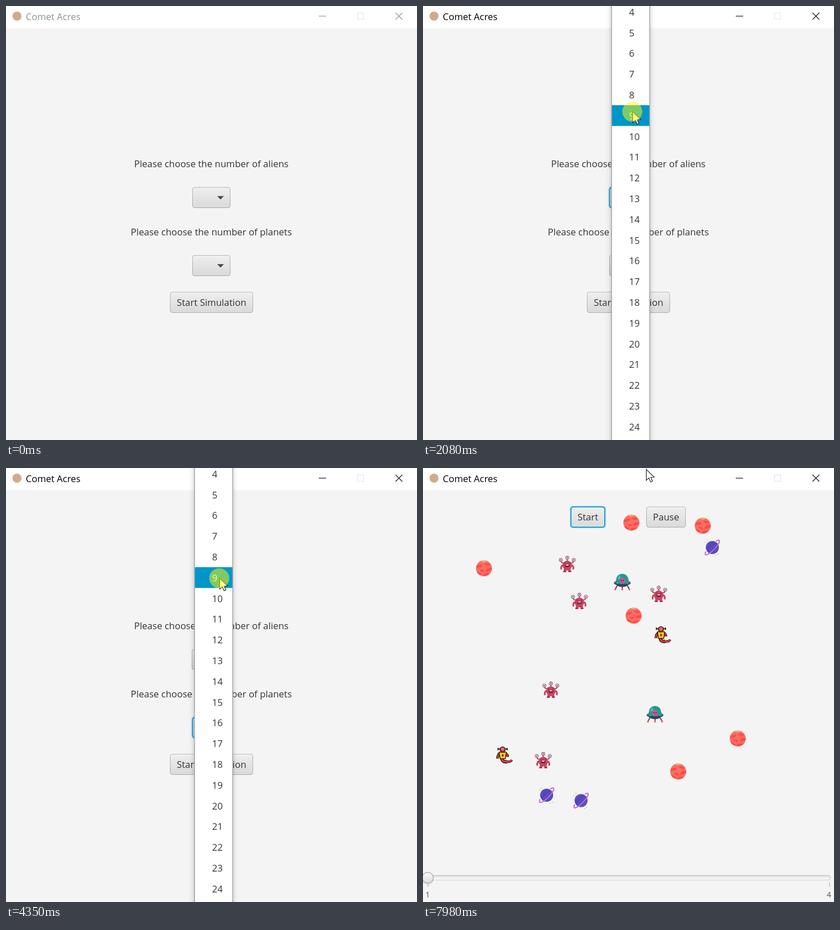
Recreate the animation shown at these times as an HTML page with a canvas. Size 728x770 px, loop 8 s.

```html
<!DOCTYPE html>
<html lang="en">
<head>
<meta charset="utf-8">
<title>Comet Acres</title>
<style>
  html, body { margin: 0; width: 100%; height: 100%; overflow: hidden; background: #f4f4f4; }
  canvas { display: block; }
</style>
</head>
<body>
<canvas id="stage" width="728" height="770"></canvas>
<script>
const ctx = document.getElementById('stage').getContext('2d');
const LOOP = 8000, STEP = 70;
const FONT = '"Open Sans", "Noto Sans", sans-serif';
const ROW = 36.8, ROW9 = 176;

// Motion is sampled in steps that restart at each of these times
const STARTS = [0, 70, 920, 1750, 2080, 2900, 3170, 4060, 4280, 6170, 6580, 6860, 7630];

// Pointer path: time, x, y
const PATH = [
  [70, 470, 772], [210, 440, 610], [350, 402, 420], [490, 386, 344], [770, 386, 341],
  [850, 391, 338], [920, 396, 330], [1060, 401, 295], [1300, 394, 246], [1500, 380, 208],
  [1680, 372, 190], [1750, 371, 187], [2220, 371, 187], [2430, 371, 330], [2620, 368, 470],
  [2690, 368, 478], [3170, 368, 478], [3310, 388, 408], [3450, 396, 330], [3650, 389, 226],
  [3800, 382, 189], [3990, 382, 189], [4060, 380, 192], [4130, 378, 195], [4420, 378, 195],
  [4630, 366, 370], [4840, 350, 508], [5040, 346, 537], [7560, 346, 537], [7630, 356, 518],
  [7700, 410, 434], [7770, 487, 302], [7840, 535, 172], [7910, 492, 66], [7980, 395, 2]
];

const PRESSES = [[560, 700], [2080, 2220], [2690, 2830], [4280, 4420], [6170, 6310]];
const POPUPS = [[770, 2220], [2900, 4420]];

const RED_PLANETS = [[369, 97], [495.5, 102.5], [108, 178], [373, 262], [557.5, 480], [452, 538.5]];
const RINGED = [[512.5, 141], [219, 580.5], [280, 590]];
const MONSTERS = [[255.5, 171], [277, 236.5], [417.5, 224], [226.5, 394], [213, 519]];
const SAUCERS = [[353, 202.5], [411, 437]];
const TAILED = [[424.5, 296], [144, 509.5]];

const within = (t, spans) => spans.some(([a, b]) => t >= a && t < b);
const clamp = v => Math.max(0, Math.min(1, v));

function sampleTime(t) {
  const start = STARTS.filter(s => s <= t).pop();
  return start + Math.floor((t - start) / STEP) * STEP;
}

function pointerAt(t) {
  if (t < PATH[0][0]) return null;
  const i = PATH.findIndex(k => k[0] > t);
  if (i < 0) return PATH[PATH.length - 1].slice(1);
  const a = PATH[i - 1], b = PATH[i], u = (t - a[0]) / (b[0] - a[0]);
  return [a[1] + (b[1] - a[1]) * u, a[2] + (b[2] - a[2]) * u];
}

function text(str, x, y, color = '#333', align = 'left', size = 16.5) {
  ctx.font = `${size}px ${FONT}`;
  ctx.textAlign = align;
  ctx.fillStyle = color;
  ctx.fillText(str, x, y);
}

function shade(y, h, top, bottom) {
  const g = ctx.createLinearGradient(0, y, 0, y + h);
  g.addColorStop(0, top);
  g.addColorStop(1, bottom);
  return g;
}

function round(x, y, w, h, r, fill) {
  ctx.beginPath();
  ctx.roundRect(x, y, w, h, r);
  ctx.fillStyle = fill;
  ctx.fill();
}

function oval(x, y, rx, ry, fill, angle = 0) {
  ctx.beginPath();
  ctx.ellipse(x, y, rx, ry, angle, 0, 7);
  ctx.fillStyle = fill;
  ctx.fill();
}

function poly(points, fill) {
  ctx.beginPath();
  points.forEach(([x, y]) => ctx.lineTo(x, y));
  ctx.closePath();
  ctx.fillStyle = fill;
  ctx.fill();
}

function line(points, color, width) {
  ctx.beginPath();
  points.forEach(([x, y]) => ctx.lineTo(x, y));
  ctx.strokeStyle = color;
  ctx.lineWidth = width;
  ctx.stroke();
}

function curve(x0, y0, cx, cy, x1, y1, color, width) {
  ctx.beginPath();
  ctx.moveTo(x0, y0);
  ctx.quadraticCurveTo(cx, cy, x1, y1);
  ctx.strokeStyle = color;
  ctx.lineWidth = width;
  ctx.stroke();
}

function control(x, y, w, h, focused) {
  if (focused) {
    round(x - 2, y - 2, w + 4, h + 4, 6, 'rgba(3,158,211,.16)');
    round(x - .5, y - .5, w + 1, h + 1, 5, '#1a9fd0');
  } else {
    round(x, y, w, h, 4.5, shade(y, h, '#bdbdbd', '#a9a9a9'));
  }
  const e = focused ? 1.6 : 1.3;
  round(x + e, y + e, w - 2 * e, h - 2 * e, 3.5, shade(y, h, '#fcfcfc', '#e4e4e4'));
  round(x + 2.4, y + 2.4, w - 4.8, h - 4.8, 3, shade(y, h, '#efefef', '#d9d9d9'));
}

function button(label, x, y, w, focused) {
  control(x, y, w, 37, focused);
  text(label, x + w / 2, y + 24.6, '#333', 'center');
}

function combo(y, value, focused) {
  if (value) control(329, y, 69, 37, focused);
  else control(330, y, 67.5, 37, focused);
  if (value) text(value, 341, y + 24.6);
  poly([[374, y + 16], [386, y + 16], [380, y + 22]], '#55453a');
}

function titleBar(active) {
  const ink = active ? '#1c1c1c' : '#9a9a9a';
  ctx.fillStyle = '#fff';
  ctx.fillRect(0, 0, 728, 39.5);
  oval(19.5, 18, 8, 8, '#d2a98c');
  text('Comet Acres', 35, 25, active ? '#000' : '#8b9496');
  line([[554, 18], [567, 18]], ink, 1.2);
  ctx.strokeStyle = '#e3e3e3';
  ctx.lineWidth = 1;
  ctx.strokeRect(622.5, 12.5, 11, 11);
  line([[690, 12], [702, 24]], ink, 1.2);
  line([[702, 12], [690, 24]], ink, 1.2);
}

function setupScreen(t) {
  text('Please choose the number of aliens', 363.7, 286, '#333', 'center');
  text('Please choose the number of planets', 363.7, 406.5, '#333', 'center');
  combo(321.2, t >= 2220 && '9', t >= 560 && t < 2690);
  combo(442, t >= 4420 && '9', t >= 2690 && t < 6170);
  button('Start Simulation', 290.5, 507.3, 147, t >= 6170);
}

function popup(pointerY) {
  ctx.save();
  ctx.shadowColor = 'rgba(0,0,0,.25)';
  ctx.shadowBlur = 9;
  ctx.fillStyle = '#9b9b9b';
  ctx.fillRect(333.3, -30, 68.8, 830);
  ctx.restore();
  ctx.fillStyle = '#fff';
  ctx.fillRect(334.6, -30, 66.3, 830);
  const chosen = 9 + Math.floor((pointerY - ROW9) / ROW);
  for (let n = 4; n <= 24; n++) {
    const y = ROW9 + (n - 9) * ROW;
    if (n === chosen) {
      ctx.fillStyle = '#0096c9';
      ctx.fillRect(334.6, y, 66.3, ROW);
    }
    text(n, 365, y + 24.8, n === chosen ? '#fff' : '#333');
  }
}

function redPlanet() {
  oval(0, 0, 14.2, 14.2, '#ff6d60');
  ctx.save();
  ctx.beginPath();
  ctx.arc(0, 0, 14.2, 0, 7);
  ctx.clip();
  oval(0, -14, 6, 3, '#e3b184');
  oval(-8, -4, 5.5, 2.2, '#fb4a4a', -.3);
  oval(6, -7, 5, 1.8, '#fb4a4a', .2);
  oval(9, 2, 6, 2.4, '#fb4a4a', -.3);
  oval(-3, 4, 4, 1.7, '#fb4a4a', .2);
  oval(-9, 9, 5, 2, '#fb4a4a', .4);
  oval(4, 11, 6, 2, '#fb4a4a', -.2);
  ctx.restore();
}

function ringedPlanet() {
  oval(0, 0, 11.5, 11.5, '#5546bb');
  for (const d of [-6, 0, 6]) line([[d - 5, d + 5], [d + 5, d - 5]], '#6254c8', 1.4);
  ctx.save();
  ctx.rotate(-.8);
  ctx.beginPath();
  ctx.ellipse(0, 0, 17.5, 4.6, 0, -.75, Math.PI + .75);
  ctx.strokeStyle = '#bd6fce';
  ctx.lineWidth = 2.1;
  ctx.stroke();
  ctx.restore();
  for (const [x, y] of [[-9, -13], [-12, -9], [10, 12], [6, 14]]) oval(x, y, 1, 1, '#f3c44e');
}

function monster() {
  const red = '#c9435d', dark = '#8e2d4b';
  for (const s of [-1, 1]) {
    curve(s * 5, -3, s * 10, -1, s * 11.5, -6, dark, 1.5);
    curve(s * 7, 1, s * 12, 3, s * 10.5, 9, red, 3);
    round(s * 4 - 2.2, 8, 4.4, 5, 1, red);
    round(s * 4.5 - 2.8, 11.6, 5.6, 2.2, 1, dark);
  }
  line([[0, -5], [0, -11]], dark, 1.5);
  oval(0, 2, 8.2, 8.8, red);
  for (const [x, y] of [[-11.5, -8], [0, -11.7], [11.5, -8]]) {
    oval(x, y, 3.2, 3.2, dark);
    oval(x, y, 2.4, 2.4, '#f6f1f2');
    oval(x, y, 1.1, 1.1, '#3a3850');
  }
  oval(-4, -2, 1.1, 1.1, dark);
  oval(4, -2, 1.1, 1.1, dark);
  oval(0, 2.2, 4, 2.6, '#6d2440');
  round(-2.2, .3, 4.4, 1.8, .5, '#fff');
}

function saucer() {
  for (const s of [-1, 1]) {
    line([[s * 8, 4], [s * 12.5, 12.5]], '#40536a', 2);
    oval(s * 12.5, 13, 1.8, 1.8, '#ff6359');
  }
  line([[0, 6], [0, 12]], '#40536a', 2);
  oval(0, 13, 1.7, 1.7, '#ff6359');
  oval(0, 1.5, 14.8, 4.8, '#3c4d66');
  oval(0, 4, 10, 4.5, '#32425a');
  ctx.beginPath();
  ctx.arc(0, -4, 10.8, Math.PI, 0);
  ctx.lineTo(13, 1);
  ctx.quadraticCurveTo(0, 6, -13, 1);
  ctx.fillStyle = '#27988f';
  ctx.fill();
  oval(-5.5, -8, 2, 3.5, '#58bcae', .5);
  oval(0, -2, 4.8, 5.5, '#cf5c99');
  oval(-1.8, -3, 1, 1.5, '#432f58');
  oval(1.8, -3, 1, 1.5, '#432f58');
  oval(0, 1.3, 1.5, .8, '#833b70');
  for (const x of [-9, 9]) oval(x, 2, 1.3, 1, '#8ba1ad');
}

function tailed() {
  const ink = '#171111', red = '#e5373b';
  for (const [c, w] of [[ink, 6], [red, 3.4]]) {
    curve(-4, 5, -4, 13, 5, 11.5, c, w);
    curve(5, 11.5, 11, 12.5, 13.5, 8.5, c, w * .7);
    curve(-7, -4, -12, -1, -12, 6, c, w * .75);
    curve(1, -4, 6, -1, 6, 3, c, w * .75);
  }
  poly([[-10, -6], [4, -6], [2.5, 7], [-8, 7]], ink);
  poly([[-8.5, -4.7], [2.8, -4.7], [1.4, 5.8], [-6.8, 5.8]], '#ffc91f');
  poly([[-2, -3], [-5, 1], [-3, 1], [-4, 4], [-.5, 0], [-2.5, 0]], ink);
  line([[-12, -11], [6, -11]], ink, 1.5);
  line([[-11, -13], [-11, -8.5]], ink, 1.6);
  line([[5, -13], [5, -8.5]], ink, 1.6);
  oval(-3, -10, 5.3, 5.2, ink);
  oval(-3, -10, 4, 3.9, red);
  oval(-3, -11, 2, 1.8, '#fff');
  oval(-3, -11, 1, 1, ink);
}

function place(spots, draw) {
  for (const [x, y] of spots) {
    ctx.save();
    ctx.translate(x, y);
    draw();
    ctx.restore();
  }
}

function slider(alpha) {
  round(1, 722.5, 721, 9, 4.5, shade(722, 9, '#b9b9b9', '#cfcfcf'));
  round(2, 723.7, 719, 6.8, 3.4, shade(723, 7, '#e4e4e4', '#fafafa'));
  oval(8.5, 728, 10.8, 10.8, 'rgba(0,0,0,.08)');
  oval(8.5, 727, 10.3, 10.3, '#a9a9a9');
  oval(8.5, 727, 9.1, 9.1, shade(717, 20, '#fbfbfb', '#dcdcdc'));
  line([[9, 738], [9, 743]], '#b5b5b5', 1.3);
  line([[720, 735], [720, 743]], '#b5b5b5', 1.3);
  ctx.globalAlpha = alpha;
  text('1', 8.3, 762, '#555', 'center', 14);
  text('4', 719, 762, '#555', 'center', 14);
  ctx.globalAlpha = 1;
}

function spaceScreen(t) {
  button('Start', 261.5, 68.5, 61, true);
  button('Pause', 395.5, 68.5, 70, false);
  place(RED_PLANETS, redPlanet);
  place(RINGED, ringedPlanet);
  place(MONSTERS, monster);
  place(SAUCERS, saucer);
  place(TAILED, tailed);
  slider(clamp((t - 6530) / 680));
}

function pointer([x, y], pressed) {
  ctx.save();
  ctx.translate(x + .5, y + .5);
  poly([[0, 0], [0, 19.5], [4.6, 15.2], [7.8, 22.3], [11, 20.9], [7.9, 14], [14, 13.8]], '#fff');
  ctx.strokeStyle = '#1d1d1d';
  ctx.lineWidth = 1.1;
  ctx.stroke();
  ctx.restore();
  if (pressed) oval(x - .3, y + .6, 17.7, 17.7, 'rgba(255,255,0,.5)');
}

function draw(t) {
  const step = sampleTime(t), tip = pointerAt(step);
  ctx.fillStyle = '#f4f4f4';
  ctx.fillRect(0, 0, 728, 770);
  titleBar(t >= 560);
  if (t < 6580) setupScreen(t);
  else spaceScreen(step);
  if (within(t, POPUPS)) popup(tip[1]);
  if (tip) pointer(tip, within(t, PRESSES));
}

const began = performance.now();
function tick() {
  draw((performance.now() - began) % LOOP);
  requestAnimationFrame(tick);
}
tick();
</script>
</body>
</html>
```
